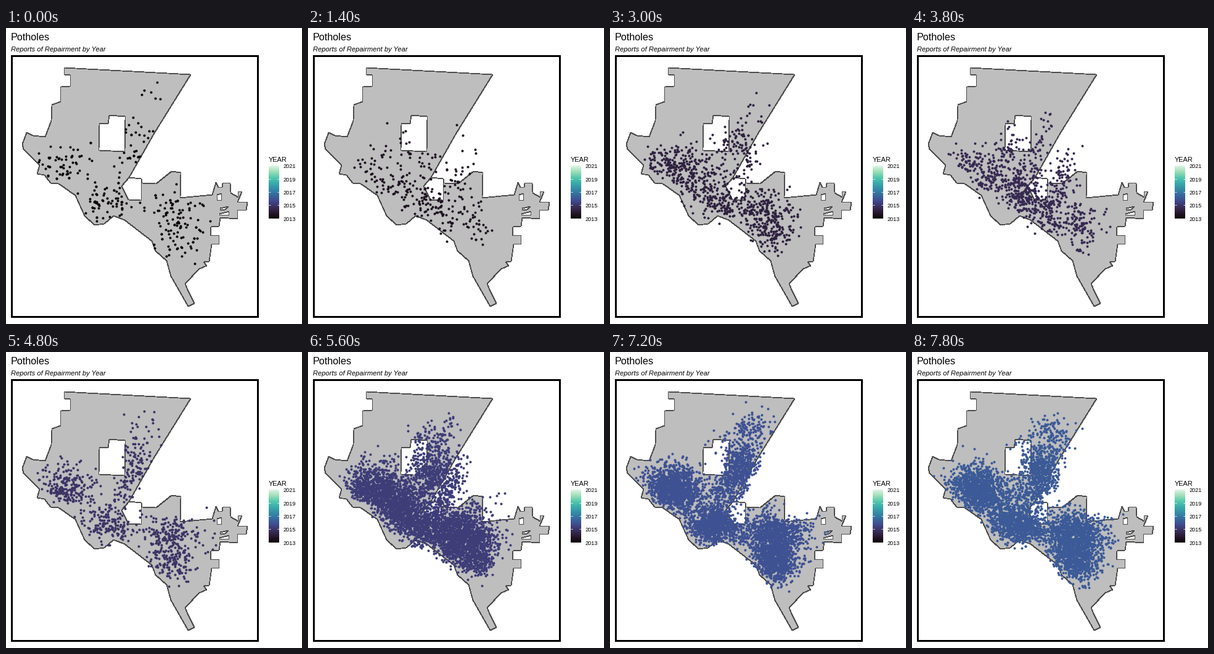
Recreate the animation shown at these times as a matplotlib script. Size 480 px wide and 480 px high, loop 8000 ms.

```python
import numpy as np
import matplotlib.pyplot as plt
from matplotlib.animation import FuncAnimation
from matplotlib.colors import LinearSegmentedColormap
from matplotlib.patches import Polygon, Rectangle
from matplotlib.path import Path

SIZE, DPI = 480, 100
PX = 72 / DPI                         # points per pixel
FRAMES, STEP_MS = 40, 200
YEAR_FRAMES = 12.4                    # frames from one year to the next
COUNTS = [250, 280, 850, 4800, 4800]  # reports in each year

mako = LinearSegmentedColormap.from_list("mako", [
    "#0B0405", "#28192F", "#3B2F5E", "#40498E", "#366A9F",
    "#348AA6", "#38AAAC", "#54C9AD", "#A0DFB9", "#DEF5E5"])

# Corners of the city limits, clockwise from the north-west
CITY = [
    (94, 64), (299, 75), (240, 170), (199, 242), (219, 244), (220, 251),
    (243, 252), (268, 232), (283, 234), (282, 275), (334, 270), (340, 250),
    (344, 258), (350, 258), (351, 251), (363, 251), (364, 267), (376, 274),
    (376, 265), (382, 265), (375, 282), (391, 282), (389, 295), (375, 295),
    (375, 309), (347, 307), (345, 321), (332, 322), (331, 336), (345, 336),
    (345, 350), (333, 350), (329, 378), (320, 379), (325, 385), (313, 390),
    (290, 414), (294, 424), (305, 446), (295, 451), (267, 402), (260, 377),
    (242, 361), (236, 345), (192, 311), (174, 304), (159, 317), (143, 319),
    (127, 304), (112, 271), (85, 252), (72, 251), (62, 238), (50, 236),
    (54, 222), (28, 196), (26, 188), (33, 169), (43, 174), (63, 176),
    (73, 150), (74, 124), (88, 119), (88, 95), (104, 94), (104, 76), (94, 75)]
HOLES = [
    [(150, 198), (192, 200), (193, 143), (167, 141), (165, 155), (151, 154)],
    [(187, 256), (199, 242), (219, 244), (219, 279), (198, 278)],
    [(342, 270), (349, 268), (349, 279), (342, 279)],
    [(347, 292), (360, 289), (355, 294), (347, 295)],
    [(346, 301), (361, 297), (361, 303), (346, 303)]]

# Districts: x, y, spread x, spread y, share of all reports
DISTRICTS = np.array([
    (235, 110, 15, 15, 0.02),
    (210, 185, 20, 26, 0.16),
    (92, 217, 25, 19, 0.24),
    (185, 235, 14, 18, 0.03),
    (168, 282, 27, 16, 0.20),
    (275, 298, 28, 18, 0.18),
    (272, 345, 19, 21, 0.17)])

rng = np.random.default_rng(2013)
limits = Path(CITY + CITY[:1])
gaps = [Path(h + h[:1]) for h in HOLES]


def year_points(n):
    """Scatter n reports over the districts, keeping to the city area."""
    share = DISTRICTS[:, 4] / DISTRICTS[:, 4].sum()
    x, y, sx, sy, _ = DISTRICTS[rng.choice(len(share), 4 * n, p=share)].T
    pts = np.column_stack([rng.normal(x, sx), rng.normal(y, sy)])
    inside = limits.contains_points(pts)
    for gap in gaps:
        inside &= ~gap.contains_points(pts)
    return pts[inside][:n]


def pair(a, b):
    """Match two point sets at random, splitting points of the smaller one."""
    n = max(len(a), len(b))
    return np.resize(rng.permutation(a), (n, 2)), np.resize(b, (n, 2))


years = [year_points(n) for n in COUNTS]
moves = [pair(a, b) for a, b in zip(years, years[1:])]

fig = plt.figure(figsize=(SIZE / DPI, SIZE / DPI), dpi=DPI, facecolor="white")
ax = fig.add_axes([0, 0, 1, 1])
ax.axis("off")


def label(x, y, text, px, **kw):
    ax.text(x, y, text, fontsize=px * PX, family="Liberation Sans",
            va="baseline", **kw)


def area(pts, fill):
    # Half a pixel centres the thin outline on the pixel grid
    ax.add_patch(Polygon(np.add(pts, 0.5), fc=fill, ec="#4d4d4d",
                         lw=0.8 * PX, antialiased=False, zorder=1))


area(CITY, "#bebebe")
for hole in HOLES:
    area(hole, "white")

ax.add_patch(Rectangle((9.5, 45.5), 399, 423, fill=False, ec="black",
                       lw=3 * PX, joinstyle="miter", snap=False, zorder=4))

label(8, 20, "Potholes", 16.2)
label(8, 38, "Reports of Repairment by Year", 11.08, style="italic")
label(426, 217, "YEAR", 11)

ramp = mako(np.linspace(1, 0, 256))[:, None, :]
ax.imshow(ramp, extent=(426, 443, 309, 223), aspect="auto", zorder=2)
for i in range(5):
    y = 223.5 + 21.3 * i
    for x in (426, 439.6):
        ax.plot([x, x + 3.4], [y, y], color="white", lw=0.8 * PX, zorder=3,
                solid_capstyle="butt")
    label(449, y + 3.9, str(2021 - 2 * i), 9.15)

dots, = ax.plot([], [], "o", ms=4 * PX, mew=0, antialiased=False, zorder=3)
ax.set_xlim(0, SIZE)
ax.set_ylim(SIZE, 0)


def update(frame):
    year = frame / YEAR_FRAMES
    k = int(year)
    t = year - k
    a, b = moves[k]
    dots.set_data(*((1 - t) * a + t * b).T)
    dots.set_color(mako(year / 8))
    return dots,


anim = FuncAnimation(fig, update, frames=FRAMES, interval=STEP_MS, repeat=True)
plt.show()
```
